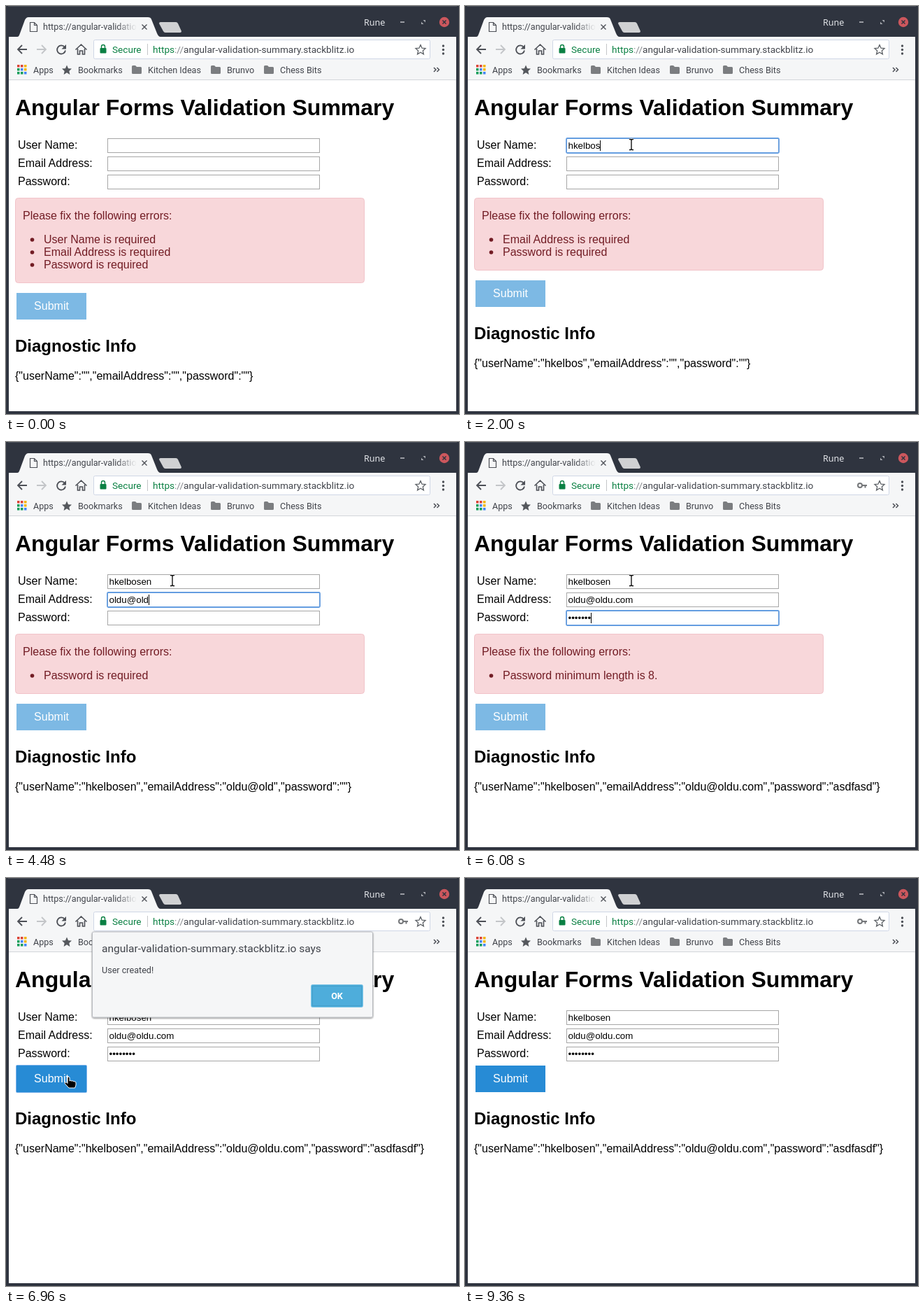
These frames come from a looping animation (648x583 px, 9.44 s). An HTML page:

```html
<!DOCTYPE html>
<html lang="en">
<head>
<meta charset="utf-8">
<title>Form validation</title>
<style>
html, body { margin: 0; width: 100%; height: 100%; overflow: hidden; background: #2f343f; }
svg { display: block; width: 648px; height: 583px; }
text { white-space: pre; }
.ui { font: 12.6px Roboto, sans-serif; fill: #41444b; }
.url { font-size: 13.6px; }
.page { font: 16px "Liberation Sans", Arial, sans-serif; fill: #000; }
.page .typed { font-size: 13.333px; }
.page .h1 { font-size: 32px; font-weight: bold; }
.page .h2 { font-size: 24px; font-weight: bold; }
.alert text, .alert circle { fill: #721c24; }
.line { fill: none; stroke: #4d5057; stroke-width: 1.8; }
.thin { stroke-width: 1.2; }
</style>
</head>
<body>
<svg viewBox="0 0 648 583">
  <defs>
    <linearGradient id="fade" gradientUnits="userSpaceOnUse" x1="158" x2="187">
      <stop stop-color="#41444b"/><stop offset="1" stop-color="#41444b" stop-opacity="0"/>
    </linearGradient>
    <filter id="shadow" x="-5%" y="-10%" width="110%" height="125%">
      <feDropShadow dx="0" dy="1" stdDeviation="1.3" flood-opacity=".5"/>
    </filter>
    <path id="folder" d="M0 1.5Q0 0 1.5 0H5l2 2h6q1.500 1.500 0V11q0 1.500-1.500 1.500h-11.500Q0 12.500 0 11Z" fill="none"/>
    <path id="star" d="M0-7 2.100-2.300 7-1.900 3.300 1.500 4.400 6.400 0 3.800-4.400 6.400-3.300 1.500-7-1.900-2.100-2.300Z"/>
    <path id="dir" d="M0 1.500Q0 0 1.500 0H5L7 2H12.500Q14 2 14 3.500V10.500Q14 12 12.500 12H1.500Q0 12 0 10.500Z" fill="#7b7d80"/>
  </defs>

  <!-- window frame and tab strip -->
  <path d="M0 583V4Q0 0 4 0H644Q648 0 648 4V583Z" fill="#2f343f"/>
  <path d="M3 .5H645" stroke="#4a4f59"/>
  <path d="M4 44H16C18 44 19 42 20 39L27 20Q29 16 32 16H203Q207 16 208 19L216 39Q218 44 221 44H644V106H4Z" fill="#f5f6f7"/>
  <path d="M221 23H243Q245 23 246 25L251 36Q251 38 249 38H228Q226 38 225 36L219 25Q219 23 221 23Z" fill="#d0d1d3"/>
  <path class="line thin" d="M34.500 23.500H40.500L44.500 27.500V36.500H34.500ZM40.500 23.500V27.500H44.500"/>
  <text class="ui" x="53" y="34" style="fill:url(#fade)">https://angular-validatio</text>
  <path class="line" d="M194.500 26.500l7 7m0-7l-7 7" style="stroke-width:1.400"/>
  <text x="512" y="28" font-family="Noto Sans, sans-serif" font-size="12.500" fill="#e4e6ea">Rune</text>
  <path d="M564 23H570" stroke="#a5a8ae" stroke-width="1.800"/>
  <path d="M596.500 20H600V23.500ZM594 22.500V26H597.500Z" fill="#a5a8ae"/>
  <circle cx="627" cy="23" r="7.200" fill="#cc575d"/>
  <path d="M624.500 20.500l5 5m0-5l-5 5" stroke="#2f343f" stroke-width="1.500"/>

  <!-- toolbar -->
  <path class="line" d="M30 62H17.500M23 56L17 62L23 68"/>
  <path class="line" d="M44 62H56.500M51 56L57 62L51 68" style="stroke:#c3c5c8"/>
  <path class="line" d="M84 59A6 6 0 1 0 85 63.500"/>
  <path d="M86 55V61.500H79.500Z" fill="#4d5057"/>
  <path class="line" d="M99.500 62.500L107.500 55L115.500 62.500M102.500 61V69H105.500V64H109.500V69H112.500V61" style="stroke-width:1.600"/>
  <rect x="125.500" y="48.500" width="481" height="27" rx="2" fill="#fff" stroke="#cfd6e6"/>
  <rect x="134.500" y="60" width="9" height="7.500" rx="1" fill="#0b8043"/>
  <path d="M136.500 60V58a2.500 2.500 0 0 1 5 0V60" fill="none" stroke="#0b8043" stroke-width="1.400"/>
  <text class="ui url" x="152" y="67" style="fill:#0b8043">Secure</text>
  <path d="M202.500 54V70" stroke="#c4c6c9"/>
  <text class="ui url" x="210" y="67"><tspan fill="#0b8043">https</tspan><tspan fill="#85888d">://</tspan>angular-validation-summary.stackblitz.io</text>
  <use href="#star" x="593" y="62.500" fill="none" stroke="#5f6368" stroke-width="1.300"/>
  <g id="key" fill="none" stroke="#75777a" stroke-width="2">
    <circle cx="565" cy="62" r="3"/><path d="M568 62H575M572.500 62V65.500"/>
  </g>
  <g fill="#4d5057"><circle cx="625.500" cy="57" r="1.700"/><circle cx="625.500" cy="62.500" r="1.700"/><circle cx="625.500" cy="68" r="1.700"/></g>

  <!-- bookmarks -->
  <g id="apps"></g>
  <use href="#star" x="87" y="91.500" fill="#55585d"/>
  <use href="#dir" x="180" y="85"/><use href="#dir" x="293" y="85"/><use href="#dir" x="369" y="85"/>
  <g class="ui">
    <text x="39" y="96">Apps</text><text x="103" y="96">Bookmarks</text><text x="203" y="96">Kitchen Ideas</text>
    <text x="316" y="96">Brunvo</text><text x="392" y="96">Chess Bits</text>
  </g>
  <path class="line" d="M612 88l3 3l-3 3M616.500 88l3 3l-3 3" style="stroke-width:1.500"/>

  <!-- page -->
  <path d="M4 105H644V579H4Z" fill="#fff"/>
  <path d="M4 105.500H644" stroke="#d3d5d9"/>
  <g class="page">
    <text class="h1" x="13" y="156">Angular Forms Validation Summary</text>
    <text x="17" y="204">User Name:</text><text x="17" y="230">Email Address:</text><text x="17" y="256">Password:</text>
    <g id="inputs"></g>
    <rect id="focus" x="145" width="304" height="21" rx="1.500" fill="none" stroke="#649de0" stroke-width="1.800"/>
    <rect id="caret" width="1" height="15"/>
    <g id="alert" class="alert">
      <rect id="alertBox" x="13.500" y="274.500" width="499" rx="4" fill="#f8d7da" stroke="#f1c3c9"/>
      <text x="24" y="305">Please fix the following errors:</text>
      <g id="items"></g>
    </g>
    <g id="lower">
      <rect id="button" x="15" width="100" height="38"/>
      <rect id="ring" x="14.500" y="-.5" width="101" height="39" rx="1" fill="none" stroke="#7db2ea"/>
      <text x="65" y="24" text-anchor="middle" style="fill:#fff">Submit</text>
      <text class="h2" x="13" y="84">Diagnostic Info</text>
      <text id="json" x="13" y="124"></text>
    </g>
  </g>

  <g id="dialog">
    <rect x="123.500" y="77" width="401" height="122" rx="2" fill="#f5f6f7" stroke="#b9bcc1" filter="url(#shadow)"/>
    <text class="ui" x="137" y="106" style="font-size:15.500px">angular-validation-summary.stackblitz.io says</text>
    <text class="ui" x="137" y="136">User created!</text>
    <rect id="ok" x="436.500" y="152.500" width="74" height="32" rx="2" stroke="#7cc4e6"/>
    <rect x="438.500" y="154.500" width="70" height="28" fill="none" stroke="#449fca"/>
    <text class="ui" x="473.500" y="173" text-anchor="middle" style="fill:#fff;font-weight:bold">OK</text>
  </g>

  <g id="cursor" stroke-linejoin="round">
    <path id="beam" d="M-3-7.500H-1L0-6.500L1-7.500H3M0-6.500V6.500M-3 7.500H-1L0 6.500L1 7.500H3" fill="none"/>
    <path id="arrow" d="M.5.5V17L4.500 13.500L7.500 20.500L10.500 19L7.500 12.500H13Z" fill="#000" stroke="#fff"/>
    <path id="hand" d="M0 1Q1.500-1 3 1V6Q5 4.500 6 6.200Q8 5 9 7Q11 6 12 8V12L10.500 16H2L-4 9.500Q-4 7 -1.500 8L0 9.500Z" fill="#000" stroke="#fff"/>
  </g>
</svg>

<script>
const LOOP = 9440, FRAME = 80;
const $ = id => document.getElementById(id);
const make = (parent, tag, attrs, text = "") => {
  const el = document.createElementNS("http://www.w3.org/2000/svg", tag);
  for (const name in attrs) el.setAttribute(name, attrs[name]);
  el.textContent = text;
  return parent.appendChild(el);
};
const show = (el, on) => el.setAttribute("visibility", on ? "visible" : "hidden");
const set = (el, attrs) => { for (const name in attrs) el.setAttribute(name, attrs[name]); };
const setText = (el, text) => { if (el.textContent !== text) el.textContent = text; };
// last row of a [time, ...values] table that has begun
const at = (rows, t) => rows.filter(row => row[0] <= t).pop();
const within = (t, from, to) => t >= from && t < to;

// [time, characters typed]
const USER = [[0, 0], [1520, 1], [1680, 3], [1840, 4], [1920, 6], [2000, 7], [2080, 8], [2160, 9]];
const MAIL = [[0, 0], [3280, 1], [3360, 2], [3440, 3], [3520, 4], [3760, 5], [3920, 6], [4000, 7],
  [4080, 8], [4160, 9], [4480, 8], [4560, 9], [4720, 10], [4800, 12], [4880, 13]];
const PASS = [[0, 0], [5440, 1], [5520, 2], [5600, 3], [5680, 4], [6080, 7], [6160, 8]];
const FOCUS = [[0, -1], [720, 0], [2400, 1], [5040, 2], [6800, -1]];
const BLINKS = [[1200, 1520], [2800, 3200], [6320, 6480]];
// [time, x, y, shape]
const MOUSE = [[0, 0, 0, ""], [80, 2, 205, "arrow"], [160, 44, 208, "arrow"], [240, 98, 210, "arrow"],
  [320, 158, 225, "beam"], [400, 198, 220, "beam"], [480, 222, 210, "beam"], [560, 234, 202, "beam"],
  [640, 238, 198, "beam"], [6480, 222, 206, "beam"], [6560, 166, 246, "beam"], [6640, 108, 279, "hand"],
  [6720, 88, 284, "hand"], [7040, 142, 236, "arrow"], [7120, 262, 128, "arrow"], [7200, 390, 48, "arrow"],
  [7280, 448, 28, "arrow"], [7360, 455, 115, "arrow"], [7440, 455, 146, "arrow"], [7520, 454, 154, "arrow"],
  [7760, 0, 0, ""]];
// [time, opacity, vertical offset]
const DIALOG = [[0, 0, 0], [6800, .35, -10], [6880, .8, -3], [6960, 1, 0],
  [8000, .75, -4], [8080, .3, -11], [8160, 0, 0]];

const dots = ["#db4437", "#db4437", "#f4b400", "#0f9d58", "#4285f4", "#f4b400", "#0f9d58", "#0f9d58", "#4285f4"];
dots.forEach((fill, i) =>
  make($("apps"), "rect", { x: 16 + i % 3 * 5, y: 84 + Math.floor(i / 3) * 5, width: 3.5, height: 3.5, fill }));

const fields = [0, 1, 2].map(i => {
  const y = 189 + 26 * i;
  make($("inputs"), "rect", { x: 145.5, y: y + .5, width: 303, height: 20, fill: "#fff", stroke: "#a6a6a6" });
  return make($("inputs"), "text", { class: "typed", x: 147.5, y: y + 15 });
});
const items = [0, 1, 2].map(i => {
  const g = make($("items"), "g", { transform: `translate(0 ${339 + 18 * i})` });
  make(g, "circle", { cx: 37.5, cy: -5, r: 2.8 });
  return { g, label: make(g, "text", { x: 54, y: 0 }) };
});

function problem(name, value, min) {
  if (!value) return name + " is required";
  return value.length < min ? `${name} minimum length is ${min}.` : "";
}

function draw(t) {
  const user = "hkelbosen".slice(0, at(USER, t)[1]);
  const mailText = within(t, 4160, 4480) ? "oldu@oldy" : "oldu@oldu.com";
  const mail = mailText.slice(0, at(MAIL, t)[1]);
  const pass = "asdfasdf".slice(0, at(PASS, t)[1]);
  [user, mail, "•".repeat(pass.length)].forEach((value, i) => setText(fields[i], value));
  setText($("json"), JSON.stringify({ userName: user, emailAddress: mail, password: pass }));

  const focus = at(FOCUS, t)[1];
  show($("focus"), focus >= 0);
  show($("caret"), focus >= 0 && !BLINKS.some(([from, to]) => within(t, from, to)));
  if (focus >= 0) {
    set($("focus"), { y: 189 + 26 * focus });
    const width = fields[focus].textContent ? fields[focus].getComputedTextLength() : 0;
    set($("caret"), { x: Math.floor(147.5 + width), y: 192 + 26 * focus });
  }

  const errors = [problem("User Name", user, 4), problem("Email Address", mail, 1),
    problem("Password", pass, 8)].filter(Boolean);
  const count = errors.length;
  $("alert").style.display = count ? "" : "none";
  set($("alertBox"), { height: 67 + 18 * count });
  items.forEach(({ g, label }, i) => {
    g.style.display = i < count ? "" : "none";
    setText(label, errors[i] || "");
  });
  set($("lower"), { transform: `translate(0 ${count ? 356 + 18 * count : 268})` });
  set($("button"), { fill: count ? "#7db9e4" : "#278bd5" });
  show($("ring"), within(t, 6800, 9360));
  show($("key"), t >= 5440);

  const [, opacity, dy] = at(DIALOG, t);
  show($("dialog"), opacity > 0);
  set($("dialog"), { opacity, transform: `translate(0 ${dy})` });
  set($("ok"), { fill: within(t, 7440, 7760) ? "#63b8e0" : "#4eaddb" });

  const [, x, y, shape] = at(MOUSE, t);
  set($("cursor"), { transform: `translate(${x} ${y})` });
  for (const name of ["beam", "arrow", "hand"]) show($(name), name === shape);
  for (const el of beams) show(el, shape === "beam");
}

// the text cursor is a dark stroke over a wider white one
const halo = $("beam").cloneNode();
halo.removeAttribute("id");
set(halo, { stroke: "#fff", "stroke-width": 3 });
set($("beam"), { stroke: "#000", "stroke-width": 1.3 });
$("beam").before(halo);
const beams = [halo, $("beam")];

const start = performance.now();
function tick() {
  const t = (performance.now() - start) % LOOP;
  draw(Math.floor(t / FRAME) * FRAME);
  requestAnimationFrame(tick);
}
draw(0);
requestAnimationFrame(tick);
</script>
</body>
</html>
```
